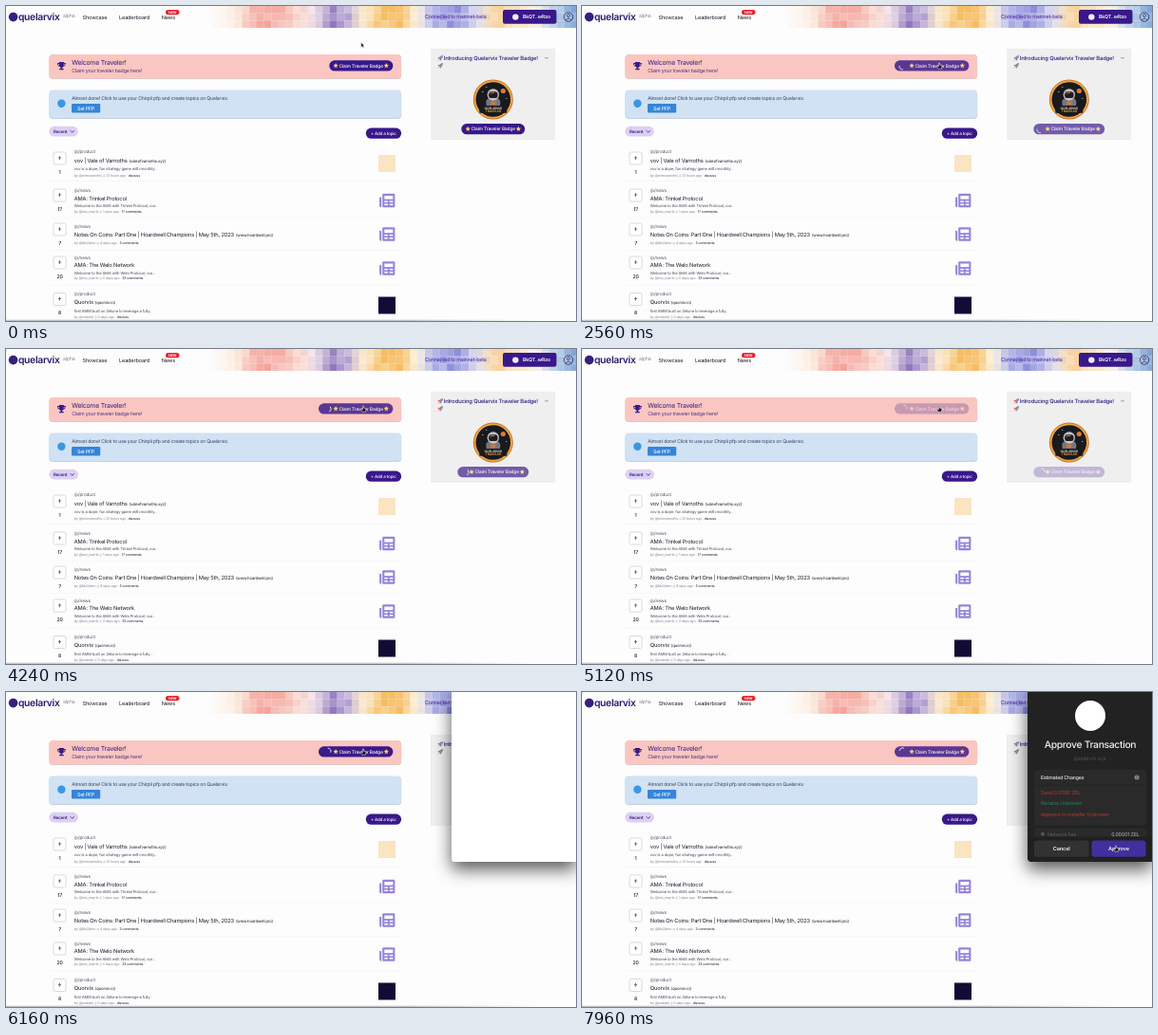
These frames come from a looping animation (600x332 px, 8 s). An HTML page:

```html
<!DOCTYPE html>
<html lang="en">
<head>
<meta charset="utf-8">
<title>Quelarvix</title>
<style>
  html, body { margin: 0; width: 100%; height: 100%; overflow: hidden; background: #fdfdfd; }
  svg { display: block; width: 100%; height: 100%; }
  text { font-family: Inter, "Open Sans", sans-serif; letter-spacing: -.03em; text-rendering: geometricPrecision; white-space: pre; }
</style>
</head>
<body>
<svg id="stage" viewBox="0 0 600 332"></svg>
<script>
const LOOP = 8000;
const INK = '#1e1a2c', PURPLE = '#38188a', GREY = '#858391';

const text = (x, y, size, content, fill = INK, weight = 400, anchor = 'start') =>
  `<text x="${x}" y="${y}" font-size="${size}" fill="${fill}" font-weight="${weight}" text-anchor="${anchor}">${content}</text>`;
const rect = (x, y, w, h, fill, r = 0, extra = '') =>
  `<rect x="${x}" y="${y}" width="${w}" height="${h}" rx="${r}" fill="${fill}" ${extra}/>`;
const circle = (x, y, r, fill, extra = '') =>
  `<circle cx="${x}" cy="${y}" r="${r}" fill="${fill}" ${extra}/>`;
const path = (d, fill, extra = '') => `<path d="${d}" fill="${fill}" ${extra}/>`;
const line = (d, stroke, width) => path(d, 'none', `stroke="${stroke}" stroke-width="${width}" stroke-linecap="round"`);
const at = (x, y, content) => `<g transform="translate(${x} ${y})">${content}</g>`;

function star(x, y) {
  const points = Array.from({ length: 10 }, (_, i) => {
    const r = i % 2 ? 1.3 : 2.8, a = i * Math.PI / 5 - Math.PI / 2;
    return `${(x + r * Math.cos(a)).toFixed(2)},${(y + r * Math.sin(a)).toFixed(2)}`;
  });
  return `<polygon points="${points}" fill="#ffd45c"/>`;
}

// Header mosaic: colour stops along x, varied per cell by seeded noise.
function mosaic() {
  const stops = [
    [210, 253, 252, 252], [238, 252, 236, 222], [260, 244, 160, 150], [284, 244, 168, 160],
    [304, 249, 208, 196], [320, 238, 216, 226], [338, 138, 112, 186], [354, 170, 150, 208],
    [372, 250, 226, 190], [390, 246, 190, 96], [412, 246, 186, 92], [428, 252, 238, 214],
    [446, 160, 164, 226], [470, 128, 130, 214], [492, 214, 212, 238], [508, 249, 206, 150],
    [528, 249, 214, 168], [554, 250, 240, 226], [576, 160, 190, 224], [600, 112, 156, 210]
  ];
  let seed = 11, out = '';
  const random = () => (seed = seed * 16807 % 2147483647) / 2147483647;
  for (let x = 210; x < 600; x += 7.7) {
    const i = Math.max(1, stops.findIndex(s => s[0] > x));
    const [a, b] = [stops[i - 1], stops[i]];
    const k = (x - a[0]) / (b[0] - a[0]);
    for (let y = 0; y < 23; y += 7.67) {
      const pale = random() * .35;
      const rgb = [1, 2, 3].map(c => Math.round((a[c] + (b[c] - a[c]) * k) * (1 - pale) + 253 * pale));
      out += rect(x, y, 7.8, 7.7, `rgb(${rgb})`);
    }
  }
  return out;
}

function header() {
  return mosaic()
    + circle(7.6, 11.6, 4.8, '#35207c')
    + text(13, 15, 10.3, 'quelarvix', '#2b1a6b', 600)
    + text(60, 12.2, 5.3, 'alpha', '#6b6680', 300)
    + text(80.5, 13.6, 5.6, 'Showcase')
    + text(119, 13.6, 5.6, 'Leaderboard')
    + text(163.8, 13.6, 5.6, 'News')
    + rect(168, 4, 14.5, 5.2, '#e8232b', 2.6)
    + text(175.2, 7.9, 3.6, 'NEW', '#fff', 600, 'middle')
    + text(441, 13.4, 5.3, 'Connected to mainnet-beta', '#3f1f9c', 400)
    + rect(523, 4, 56.5, 14.7, PURPLE, 2)
    + circle(536.3, 11.6, 3.2, '#f4f0fb')
    + text(558.5, 13.4, 5.2, 'BkQT..wRzo', '#fff', 600, 'middle')
    + circle(592, 11.6, 4.7, 'none', 'stroke="#2d2360" stroke-width=".8"')
    + circle(592, 10.2, 1.5, 'none', 'stroke="#2d2360" stroke-width=".7"')
    + line('M589 14.9Q592 11.5 595 14.9', '#2d2360', .7);
}

function banner(y, h, fill, shade) {
  return rect(45.3, y + .6, 370.9, h + .4, shade, 4) + rect(45.5, y, 370.5, h, fill, 4);
}

function banners() {
  const trophy = path('M-2.4-4H2.4V-3H4.4Q4.4.3 1.7 1Q1 1.8.7 2V3H2.3V4.3H-2.3V3H-.7V2Q-1 1.8-1.7 1Q-4.4.3-4.4-3H-2.4ZM-3.5-2.1Q-3.2-.6-2.2-.1L-2.4-2.1ZM3.5-2.1H2.4L2.2-.1Q3.2-.6 3.5-2.1Z', PURPLE);
  return banner(51, 25, '#fac6c1', '#e6c3c4')
    + at(58.4, 63, trophy)
    + text(69.2, 62, 6.9, 'Welcome Traveler!', '#34187f', 400)
    + text(69.2, 70, 5.3, 'Claim your traveler badge here!', '#4a2f80')
    + banner(88.5, 29.5, '#d0e2f4', '#c3d0df')
    + circle(58.4, 102.8, 4.2, '#3a97e4')
    + text(69.2, 98.6, 5.1, 'Almost done! Click to use your Chirpli pfp and create topics on Quelarvix.', '#373d55')
    + rect(69, 103, 30.2, 9.4, '#3585d8', 1.2)
    + text(84.1, 109.5, 5.2, 'Set PFP', '#fff', 500, 'middle')
    + rect(45.3, 126.8, 30.6, 10.8, '#dad1f4', 5.4)
    + text(50, 133.8, 4.5, 'Recent', '#34187f', 600)
    + line('M68 131.6l1.7 1.7 1.7-1.7', '#34187f', .8)
    + rect(378.8, 128.6, 37.3, 11.2, PURPLE, 5.6)
    + text(397.4, 135.8, 4.5, '+ Add a topic', '#fff', 500, 'middle');
}

function newsIcon(y) {
  const lilac = '#9685d8', paper = '#fdfdfd';
  return at(392.8, y, rect(3.4, .8, 13.2, 14.4, lilac, 1.2)
    + path('M2.4 4.6V15.2H2Q.3 15 .3 13.2V4.6Z', lilac)
    + rect(5.5, 3, 9, 3.6, paper)
    + rect(5.5, 8.4, 3.6, 1.5, paper) + rect(10.9, 8.4, 3.6, 1.5, paper)
    + rect(5.5, 11.5, 3.6, 1.5, paper) + rect(10.9, 11.5, 3.6, 1.5, paper));
}

const topics = [
  { y: 153.5, title: 9.5, body: 18.5, meta: 25, votes: 1, box: 154, kind: 'product', name: 'vov | Vale of Varnoths', link: 'valeofvarnoths.xyz',
    intro: 'vov is a dope, fun strategy game with monthly...', by: '@mirevarnoths', age: '21 hours ago', notes: 'discuss', tile: '#fbe4c2', icon: 157 },
  { y: 194.3, title: 8.5, body: 16, meta: 22, votes: 17, box: 193, kind: 'news', name: 'AMA: Trinkel Protocol',
    intro: 'Welcome to the AMA with Trinkel Protocol, our...', by: '@tolv_marrik', age: '1 days ago', notes: '17 comments', icon: 197 },
  { y: 232, title: 9, meta: 18, votes: 7, box: 229, kind: 'news', name: 'Notes On Coins: Part One | Hoardwell Champions | May 5th, 2023', link: 'www.hoardwell.pro',
    by: '@MxZarno', age: '4 days ago', notes: '3 comments', icon: 232.5 },
  { y: 265.2, title: 8, body: 16, meta: 22, votes: 20, box: 264, kind: 'news', name: 'AMA: The Welo Network',
    intro: 'Welcome to the AMA with Welo Protocol, our...', by: '@tolv_marrik', age: '5 days ago', notes: '33 comments', icon: 268.5 },
  { y: 303.2, title: 9, body: 18, meta: 25, votes: 8, box: 302.5, kind: 'product', name: 'Quorvix', link: 'quorvix.io',
    intro: 'first AMM built on Zelune to leverage a fully...', by: '@ondzek', age: '5 days ago', notes: 'discuss', tile: '#120c35', icon: 306.5 }
];

function topic(t) {
  const link = t.link ? `<tspan font-size="4.3" dx="2">(${t.link})</tspan>` : '';
  const clock = '<tspan font-size="3.4">◷</tspan>';
  return rect(50, t.box, 13, 13, '#fff', 1.6, 'stroke="#d0ced8" stroke-width=".8"')
    + line(`M56.5 ${t.box + 7.7}v-2.7m-1.2 1.2l1.2-1.2l1.2 1.2`, INK, .6)
    + text(56.6, t.box + 22.6, 5.2, t.votes, INK, 500, 'middle')
    + text(71.8, t.y + 1.5, 4.7, '/p/' + t.kind, '#55506a')
    + text(71.8, t.y + t.title + 2.1, 5.75, t.name + link, INK, 400)
    + (t.body ? text(71.8, t.y + t.body + 1.3, 4.15, t.intro, '#4e4a5d') : '')
    + text(71.8, t.y + t.meta + 1.2, 3.6, `by ${t.by} ${clock} ${t.age} · <tspan fill="${INK}">${t.notes}</tspan>`, GREY)
    + (t.tile ? rect(392, t.icon, 18, 18, t.tile) : newsIcon(t.icon));
}

function badge() {
  return at(512.8, 98.5,
    circle(0, 0, 21, '#c9762a') + circle(0, 0, 20, '#f4a83f') + circle(0, 0, 18.3, '#191a1e')
    + circle(10.5, -9, 2.6, '#d87a35') + circle(-11, -8, .6, '#fff') + circle(-7, -13, .5, '#fff') + circle(14, -1, .5, '#fff')
    + rect(-7.5, -1, 15, 9, '#77767c', 4)
    + circle(0, -5, 6.2, '#c4c3c6') + rect(-4.8, -8.2, 9.6, 6.8, '#1d1c22', 3.2)
    + line('M-3-6.4Q-1.5-7.5 1-7.2', '#e6a04c', .8)
    + rect(-2.5, 2.2, 5, 3, '#d87a35', .6)
    + rect(-14.5, 6.6, 29, 7.6, '#191a1e', 1)
    + text(0, 10, 3.4, 'QUELARVIX', '#f4e4cc', 600, 'middle')
    + text(0, 13.5, 3.4, 'TRAVELER', '#f0a143', 600, 'middle'));
}

function sideCard() {
  const rocket = path('M3-3Q-.5-2.7-1.7.2L0 1.9Q2.7.5 3-3Z', '#7d93ad')
    + path('M-1-1.2L-2.8-.5L-1.7.3ZM1.2.9L.5 2.8L-.2 1.8Z', '#d9383a')
    + path('M-1.5.8L-2.9 2.9L-.7 1.6Z', '#f39a2c');
  return rect(447, 44.7, 131.3, 96.3, '#efeff0', 1)
    + at(457.2, 55, rocket) + at(457.2, 63, rocket)
    + text(460.8, 56.9, 5.85, 'Introducing Quelarvix Traveler Badge!', '#2c1679', 500)
    + line('M567.5 54.8h3', '#6a6780', .6)
    + badge();
}

const claimButton = (id, y) => `<g id="${id}">
  ${rect(0, y, 67, 11.3, PURPLE, 5.65)}
  <g class="label">${star(-26.6, y + 5.6)}${text(0, y + 7.3, 4.85, 'Claim Traveler Badge', '#fff', 500, 'middle')}${star(26.6, y + 5.6)}</g>
  <path class="spinner" d="M0-4A4 4 0 0 1 4 0" fill="none" stroke="#fff" stroke-width=".8"/></g>`;

function popup() {
  const red = '#b5372f';
  return `<g id="popup">
    <path id="panel" d="M469 0H600V179H473Q469 179 469 175Z" filter="url(#shadow)"/>
    <g id="request">
      ${circle(535, 25, 16, '#fff')}
      ${text(535, 58.7, 10.3, 'Approve Transaction', '#f1f1f1', 500, 'middle')}
      ${text(534.7, 72, 5.8, 'quelarvix.xyz', '#515151', 400, 'middle')}
      ${rect(476, 82, 118, 58.5, '#2a2a2a', 3)}
      ${text(483, 91.7, 5.2, 'Estimated Changes', '#ededed', 500)}
      ${circle(584, 90, 2.5, '#8b8b8b')}${line('M584 89.8v1.3M584 88.6v.05', '#2a2a2a', .7)}
      ${line('M476.5 98.3H593.5', '#202020', .7)}
      ${text(483, 107.6, 5.4, 'Send 0.01197 ZEL', red)}
      ${text(483, 119.4, 5.4, 'Receive Unknown', '#2f8058')}
      ${text(483, 131, 5.5, 'Approve to transfer Unknown', red)}
      ${rect(476, 143.5, 118, 11, '#2a2a2a', 3)}
      ${circle(485, 149.8, 2, '#555')}
      ${text(490, 151.5, 5.3, 'Network Fee', '#606060')}
      ${text(586.5, 151.5, 5.3, '0.00001 ZEL', '#b5b5b5', 400, 'end')}
      ${rect(469, 152.7, 131, 23, '#202020')}
      ${rect(476, 156.5, 57.5, 17.3, '#323232', 3)}
      ${rect(536.5, 156.5, 57, 17.3, '#432e9d', 3)}
      ${text(504.7, 167, 5.6, 'Cancel', '#f1f1f1', 600, 'middle')}
      ${text(565, 167, 5.6, 'Approve', '#f1f1f1', 600, 'middle')}
    </g></g>`;
}

const cursors = `<g id="cursor" stroke="#fff" stroke-width=".5" fill="#111">
  <path id="arrow" d="M0 0V5.3L1.2 4.2L2 6L2.9 5.6L2.1 3.9H3.7Z"/>
  <path id="hand" d="M-.6-3Q0-3.7.6-3V-.8L2.5-.3Q3-.1 2.9.5L2.4 3.2H-.9L-2.5.8Q-2.3 0-1.5.3L-.6 1Z"/></g>`;

const stage = document.getElementById('stage');
stage.innerHTML = `<defs>
    <filter id="shadow" x="-50%" y="-50%" width="200%" height="200%">
      <feDropShadow dx="0" dy="8" stdDeviation="9" flood-color="#000" flood-opacity=".65"/></filter>
    <linearGradient id="edge"><stop offset=".75" stop-color="#c4c4c8"/><stop offset="1" stop-color="#fdfdfd"/></linearGradient></defs>`
  + rect(0, 0, 600, 332, '#fdfdfd') + header() + banners()
  + [184.5, 223, 257.5, 294].map(y => line(`M46 ${y}H416`, '#f0eff2', .5)).join('')
  + topics.map(topic).join('') + sideCard()
  + rect(0, 330.7, 560, 1.3, 'url(#edge)')
  + claimButton('bannerClaim', 57.3) + claimButton('cardClaim', 124) + popup() + cursors;

const $ = id => document.getElementById(id);
const show = (el, on) => el.setAttribute('visibility', on ? 'visible' : 'hidden');
const mix = (a, b, k) => a + (b - a) * k;
const progress = (t, from, to) => Math.min(1, Math.max(0, (t - from) / (to - from)));
const ease = k => k * k * (3 - 2 * k);

function track(t, keys) {
  const i = keys.findIndex(key => key[0] > t);
  if (i < 0) return keys.at(-1)[1];
  if (i === 0) return keys[0][1];
  const [[t0, a], [t1, b]] = [keys[i - 1], keys[i]];
  return mix(a, b, ease((t - t0) / (t1 - t0)));
}

function drawClaim(id, t, busy, left, right, label, spinnerX, spinnerY) {
  const button = $(id), box = button.querySelector('rect'), spinner = button.querySelector('.spinner');
  box.setAttribute('x', left);
  box.setAttribute('width', right - left);
  button.querySelector('.label').setAttribute('transform', `translate(${label} 0)`);
  spinner.setAttribute('transform', `translate(${spinnerX} ${spinnerY}) rotate(${180 + (t - 2560) / 1020 * 360})`);
  spinner.setAttribute('opacity', progress(t, 1260, 1380));
  button.setAttribute('opacity', track(t, [[1140, 1], [1240, busy], [5040, busy], [5120, .25], [5300, .25], [5600, .98], [6300, .98], [7400, busy]]));
}

function draw(t) {
  const grow = progress(t, 1180, 1390);
  drawClaim('bannerClaim', t, .82, mix(340.3, 329, grow), 407.4, 373.7, 338, 63);
  drawClaim('cardClaim', t, .68, mix(479.3, 475.3, grow), mix(546.2, 550.2, grow), mix(512.8, 516.7, grow), 483, 129.7);

  show($('popup'), t >= 5960);
  show($('request'), t >= 6680);
  $('panel').setAttribute('fill', t < 6560 ? '#fff' : '#202020');

  const reach = ease(progress(t, 450, 1100)), leave = ease(progress(t, 6760, 7480));
  const x = mix(mix(373.7, 376, reach), 562, leave), y = mix(mix(38.3, 63, reach), 165, leave);
  const pointing = (t > 900 && leave < .06) || leave > .94;
  $('cursor').setAttribute('transform', `translate(${x} ${y})`);
  show($('hand'), pointing);
  show($('arrow'), !pointing);
}

const start = performance.now();
function frame() {
  draw((performance.now() - start) % LOOP);
  requestAnimationFrame(frame);
}
frame();
</script>
</body>
</html>
```
